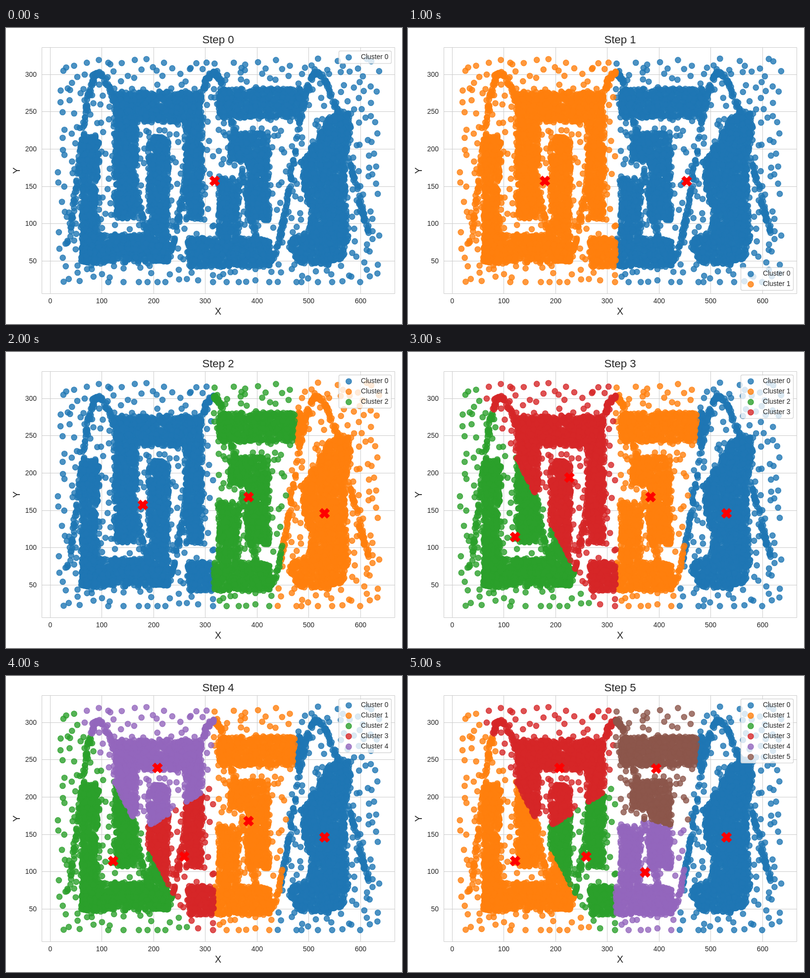
An HTML page with a canvas that plays this animation: 800x600 px, repeating every 6000 ms.

```html
<!DOCTYPE html>
<html lang="en">
<head>
<meta charset="utf-8">
<title>Bisecting clusters</title>
<style>
  html, body { margin: 0; width: 100%; height: 100%; overflow: hidden; background: #fff; }
  canvas { display: block; width: 800px; height: 600px; }
</style>
</head>
<body>
<canvas id="stage" width="800" height="600"></canvas>
<script>
const W = 800, H = 600, STEP_MS = 1000;
const COLORS = ['#1f77b4', '#ff7f0e', '#2ca02c', '#d62728', '#9467bd', '#8c564b'];
const FONT = '"Liberation Sans", Arial, sans-serif';
const INK = '#262626', RULE = '#cccccc';
const SX = 1.045, SY = 1.512;   // pixels per data unit
const stage = document.getElementById('stage').getContext('2d');

let seed = 7;
function rand() {
  seed = (seed + 0x6d2b79f5) | 0;
  let t = Math.imul(seed ^ (seed >>> 15), 1 | seed);
  t = (t + Math.imul(t ^ (t >>> 7), 61 | t)) ^ t;
  return ((t ^ (t >>> 14)) >>> 0) / 4294967296;
}
const between = (a, b) => a + (b - a) * rand();
const points = [];

// Even fill of a box, slightly ragged at its edges
function fillBox(x0, y0, x1, y1, test = () => true) {
  for (let n = (x1 - x0) * (y1 - y0) / 16; n > 0; n--) {
    const x = between(x0, x1), y = between(y0, y1);
    if (test(x, y)) points.push([x + between(-2, 2), y + between(-2, 2)]);
  }
}

function insideOf(poly) {
  return (x, y) => {
    let hit = false;
    poly.forEach(([ax, ay], i) => {
      const [bx, by] = poly[(i + 1) % poly.length];
      if ((ay > y) !== (by > y) && x < ax + (bx - ax) * (y - ay) / (by - ay)) hit = !hit;
    });
    return hit;
  };
}

// Two interlocking forks on the left
function leftForks() {
  fillBox(153, 219, 187, 475);
  fillBox(153, 419, 329, 475);
  fillBox(288, 221, 328, 418);
  fillBox(219, 130, 396, 190);
  fillBox(219, 190, 264, 386);
  fillBox(362, 190, 396, 386);
}

// Slab and two hooks in the middle
function middleHooks() {
  fillBox(429, 123, 598, 182);
  fillBox(451, 213, 531, 269);
  fillBox(488, 269, 531, 392);
  fillBox(367, 427, 533, 484);
  fillBox(429, 306, 470, 427);
}

function rightBlob() {
  const outline = [
    [680, 163], [695, 176], [695, 205], [686, 245], [685, 320], [692, 425],
    [680, 468], [655, 479], [592, 477], [573, 455], [575, 427], [612, 410],
    [617, 375], [598, 312], [601, 268], [650, 184]
  ];
  fillBox(572, 162, 696, 480, insideOf(outline));
}

// Cosine string running through alternate troughs and crests
function wave() {
  const turns = [110, 184, 318, 418, 532, 626, 770];
  for (let i = 1; i < turns.length; i++) {
    for (let k = 0; k < 130; k++) {
      const t = rand();
      const x = turns[i - 1] + (turns[i] - turns[i - 1]) * t;
      const y = 281 + (i % 2 ? 190 : -190) * Math.cos(Math.PI * t);
      if (x > 124 && x < 741) points.push([x + between(-3, 3), y + between(-3, 3)]);
    }
  }
}

// Background noise: one loose point per cell
function noise(cell) {
  for (let x = 104; x < 755; x += cell)
    for (let y = 62; y < 515; y += cell)
      points.push([Math.min(754, x + rand() * cell), Math.min(515, y + rand() * cell)]);
}

leftForks();
middleHooks();
rightBlob();
wave();
noise(21);

// Binary tree of centroids; each split divides one region in two
const leaf = (x, y) => ({ x, y });
const split = (x, y, a, b) => ({ x, y, kids: [a, b] });
const right = leaf(643.5, 327);
const midTop = leaf(501.5, 187.5), midLow = leaf(479, 398);
const mid = split(490, 294, midTop, midLow);
const leftLow = leaf(216.5, 375);
const innerTop = leaf(306, 186.5), innerLow = leaf(360, 366);
const inner = split(326, 254.5, innerTop, innerLow);
const west = split(276.5, 310, leftLow, inner);
const east = split(563, 310.5, mid, right);
const root = split(421.5, 310, west, east);

const steps = [
  [root],
  [east, west],
  [west, right, mid],
  [right, mid, leftLow, inner],
  [right, mid, leftLow, innerLow, innerTop],
  [right, leftLow, innerLow, innerTop, midLow, midTop]
];

const dist = (p, c) => Math.hypot((p[0] - c.x) / SX, (p[1] - c.y) / SY);

function clusterOf(p, groups) {
  let node = root;
  while (!groups.includes(node)) {
    const [a, b] = node.kids;
    node = dist(p, a) < dist(p, b) ? a : b;
  }
  return groups.indexOf(node);
}

function label(c, text, x, y, size, align) {
  c.font = size + 'px ' + FONT;
  c.textAlign = align;
  c.fillStyle = INK;
  c.fillText(text, x, y);
}

function dot(c, x, y, color) {
  c.globalAlpha = 0.8;
  c.fillStyle = c.strokeStyle = color;
  c.lineWidth = 1.39;
  c.beginPath();
  c.arc(x, y, 5.7, 0, Math.PI * 2);
  c.fill();
  c.stroke();
  c.globalAlpha = 1;
}

function cross(c, { x, y }) {
  const s = 4.91;
  c.save();
  c.translate(x, y);
  c.beginPath();
  for (let i = 0; i < 4; i++) {
    c.lineTo(-s, -2 * s);
    c.lineTo(0, -s);
    c.lineTo(s, -2 * s);
    c.rotate(Math.PI / 2);
  }
  c.closePath();
  c.fillStyle = c.strokeStyle = '#ff0000';
  c.lineWidth = 1.39;
  c.fill();
  c.stroke();
  c.restore();
}

function axes(c, step) {
  c.fillStyle = '#fff';
  c.fillRect(0, 0, W, H);
  c.strokeStyle = RULE;
  c.lineWidth = 1;
  c.beginPath();
  for (let v = 0; v <= 600; v += 100) {
    const x = Math.floor(89 + v * SX);
    c.moveTo(x + 0.5, 39);
    c.lineTo(x + 0.5, 538);
    label(c, v, x + 0.3, 558, 13.89, 'center');
  }
  for (let v = 50; v <= 300; v += 50) {
    const y = Math.round(547.4 - v * SY);
    c.moveTo(72, y + 0.5);
    c.lineTo(785, y + 0.5);
    label(c, v, 62, y + 5, 13.89, 'right');
  }
  c.rect(72.5, 39.5, 713, 499);
  c.stroke();
  label(c, 'Step ' + step, 428.5, 31, 22.22, 'center');
  label(c, 'X', 428.5, 581, 19.44, 'center');
  c.save();
  c.translate(28, 289);
  c.rotate(-Math.PI / 2);
  label(c, 'Y', 0, 0, 19.44, 'center');
  c.restore();
}

function legend(c, count, top) {
  c.beginPath();
  c.roundRect(672.5, top, 106, 4.5 + 20.9 * count, 3);
  c.fillStyle = 'rgba(255,255,255,0.8)';
  c.strokeStyle = 'rgba(204,204,204,0.8)';
  c.lineWidth = 1.39;
  c.fill();
  c.stroke();
  for (let i = 0; i < count; i++) {
    const y = top + 12.5 + i * 20.9;
    dot(c, 692.4, y + 0.6, COLORS[i]);
    label(c, 'Cluster ' + i, 717, Math.round(y + 4.4), 13.89, 'left');
  }
}

const pages = steps.map((groups, step) => {
  const page = document.createElement('canvas');
  page.width = W;
  page.height = H;
  const c = page.getContext('2d');
  axes(c, step);
  const sets = groups.map(() => []);
  for (const p of points) sets[clusterOf(p, groups)].push(p);
  sets.forEach((set, i) => set.forEach(([x, y]) => dot(c, x, y, COLORS[i])));
  groups.forEach(g => cross(c, g));
  legend(c, groups.length, step === 1 ? 485.5 : 46.5);
  return page;
});

function draw(now) {
  stage.drawImage(pages[Math.floor(Math.max(0, now) / STEP_MS) % pages.length], 0, 0);
  requestAnimationFrame(draw);
}
draw(0);
</script>
</body>
</html>
```
